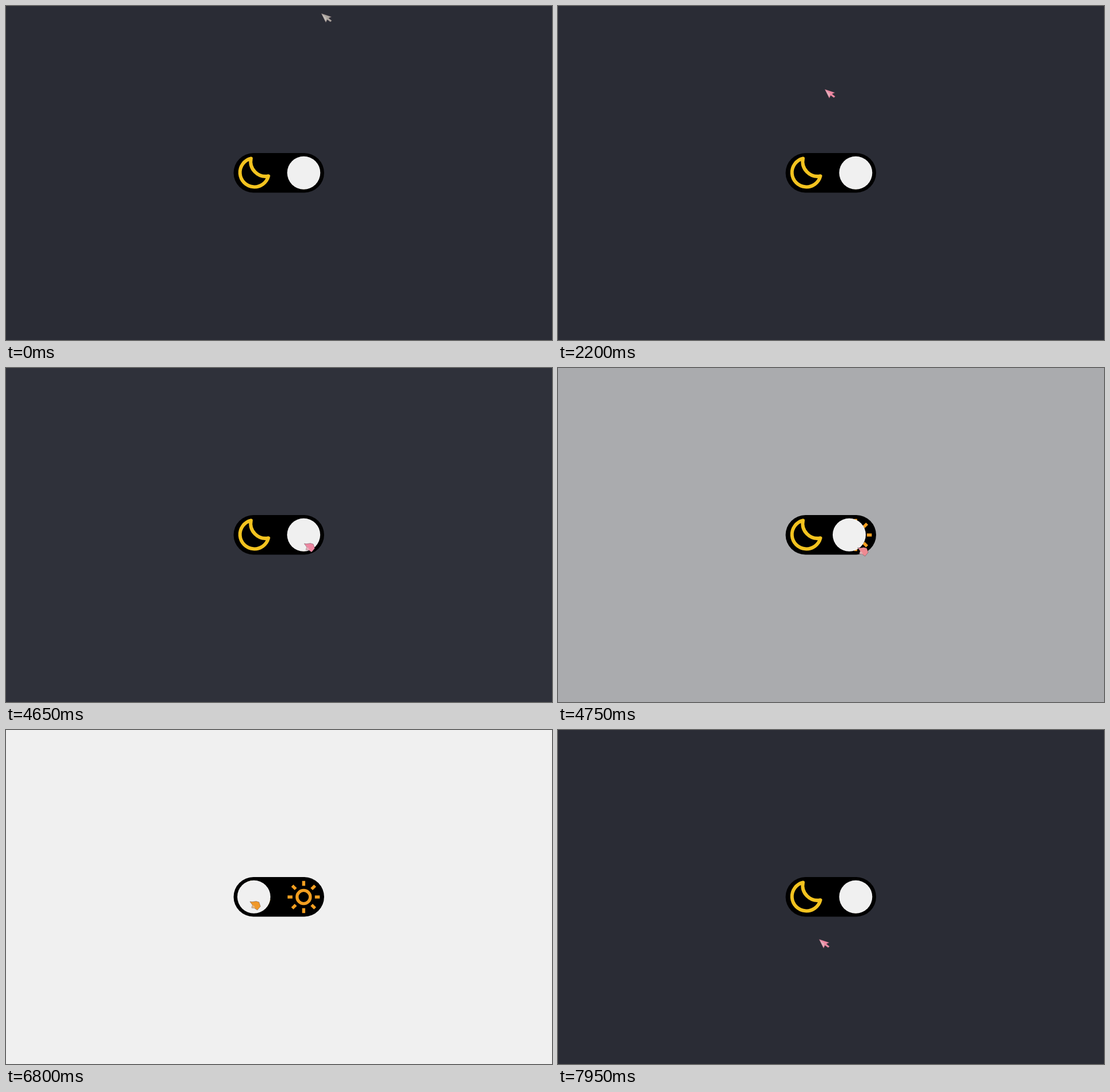
Animation, 956 px wide and 586 px high, one loop 8000 ms. Source, as an HTML page:

```html
<!DOCTYPE html>
<html lang="en">
<head>
<meta charset="utf-8">
<title>Theme toggle</title>
<style>
  html, body { margin: 0; width: 100%; height: 100%; overflow: hidden; }
  body { background: #2a2c35; }
  svg { display: block; width: 956px; height: 586px; }
  .moon { fill: none; stroke: #f3c31f; stroke-width: 6; stroke-linejoin: round; }
  .sun { fill: none; stroke: #f39f20; stroke-width: 5.4; }
  #cursor { stroke: #4a3c48; stroke-opacity: .55; stroke-width: .8; stroke-linejoin: round; }
  .shine { fill: #d8d4d2; fill-opacity: .5; stroke: none; }
</style>
</head>
<body>
<svg viewBox="0 0 956 586">
  <rect x="398.5" y="258" width="158.5" height="69.5" rx="34.75"/>
  <path class="moon" d="M429 267.5A25.3 25.3 0 1 0 459.5 298.3A26 26 0 0 1 429 267.5Z"/>
  <g class="sun" transform="translate(521.2 293)">
    <circle r="11.6"/>
    <g id="rays"></g>
  </g>
  <circle id="knob" cx="521.3" cy="292.7" r="29" fill="#f0f0f0"/>
  <g id="cursor">
    <g id="arrow">
      <path d="M0 0L18 6L13 8.3L18.5 12.8L16 15L10.5 11L8 16Z"/>
      <path class="shine" d="M1 1L9.5 8L7.5 14Z"/>
    </g>
    <g id="hand">
      <path d="M0 1L4 1.5L11 .5L16 2L18.5 9.5L13 16L8 12.5L3 12L4.5 7Z"/>
      <path class="shine" d="M4.5 7L8 9L9 12.5L3 12Z"/>
    </g>
  </g>
</svg>
<script>
const LOOP = 8000, CUT = 1700;
const LIGHT_ON = 4638, LIGHT_OFF = 6813;
const DARK = [42, 44, 53], LIGHT = [240, 240, 240];
const GREY = [170, 164, 157], PINK = [238, 136, 162], ORANGE = [240, 152, 42];
const $ = id => document.getElementById(id);

$('rays').innerHTML = Array.from({ length: 8 }, (_, i) =>
  `<path d="M19.6 0H28.2" transform="rotate(${i * 45})"/>`).join('');

const clamp = x => Math.min(1, Math.max(0, x));
const mix = (a, b, p) => a.map((v, i) => v + (b[i] - v) * p);
const rgb = color => `rgb(${color.map(Math.round)})`;
const smooth = x => x * x * (3 - 2 * x);

// The CSS timing curve, solved for x by bisection.
function bezier(x1, y1, x2, y2) {
  const at = (a, b, s) => 3 * a * s * (1 - s) ** 2 + 3 * b * s * s * (1 - s) + s ** 3;
  return x => {
    let low = 0, high = 1;
    for (let i = 0; i < 24; i++) {
      const mid = (low + high) / 2;
      if (at(x1, x2, mid) < x) low = mid; else high = mid;
    }
    return at(y1, y2, low);
  };
}
const ease = bezier(.25, .1, .25, 1);
const easeInOut = bezier(.42, 0, .58, 1);

const toggled = (time, duration, curve) =>
  curve(clamp((time - LIGHT_ON) / duration)) - curve(clamp((time - LIGHT_OFF) / duration));

// Moves: start, end, destination, sideways bow.
const leaving = { from: [552, 13], moves: [
  [0, 250, [563, 199], -22],
  [500, 1050, [40, -20], 0]
] };
const clicking = { from: [467, 146], moves: [
  [3100, 3850, [522, 307], 0],
  [LIGHT_ON, 5150, [543, 365], 0],
  [5700, 6000, [427, 300], 0],
  [6900, 7500, [441, 375], 0],
  [7949, 7950, [457, 367], 0]
] };

function position({ from, moves }, time) {
  return moves.reduce((point, [start, end, to, bow]) => {
    const p = smooth(clamp((time - start) / (end - start)));
    const [x, y] = mix(point, to, p);
    return [x + bow * Math.sin(Math.PI * p), y];
  }, from);
}

function draw(time) {
  const first = time < CUT;
  const slide = toggled(time, 450, easeInOut);
  const [x, y] = position(first ? leaving : clicking, time);
  const overPill = x > 398 && x < 557 && y > 258 && y < 327;

  document.body.style.background = rgb(mix(DARK, LIGHT, toggled(time, 300, ease)));
  $('knob').setAttribute('transform', `translate(${-87.3 * slide} 0)`);
  $('cursor').setAttribute('transform', `translate(${x} ${y})`);
  $('cursor').setAttribute('fill', rgb(first ? GREY : mix(PINK, ORANGE, slide)));
  $('cursor').setAttribute('opacity', first ? 1 : clamp((time - 1800) / 400));
  $('hand').setAttribute('visibility', overPill ? 'visible' : 'hidden');
  $('arrow').setAttribute('visibility', overPill ? 'hidden' : 'visible');
}

const begin = performance.now();
function tick() {
  draw((performance.now() - begin) % LOOP);
  requestAnimationFrame(tick);
}
tick();
</script>
</body>
</html>
```
